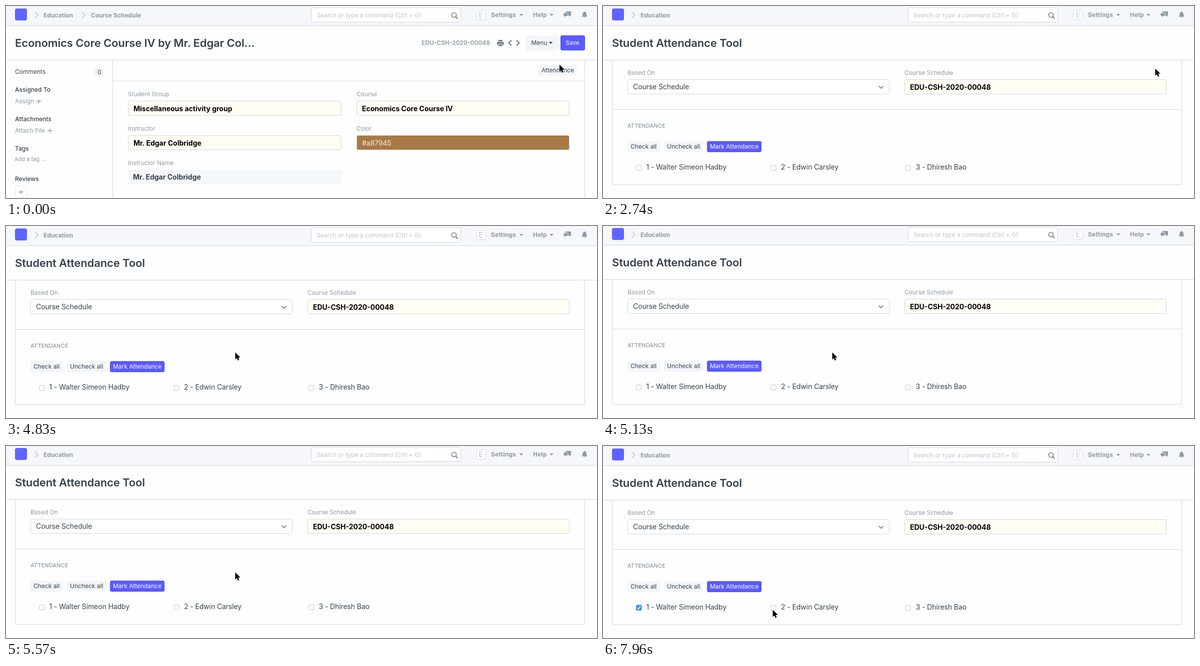
These frames come from a looping animation (1182x385 px, 8 s). An HTML page:

```html
<!DOCTYPE html>
<html lang="en">
<head>
<meta charset="utf-8">
<title>Attendance</title>
<style>
  html, body { margin: 0; width: 100%; height: 100%; overflow: hidden; background: #fefefe; }
  svg { display: block; }
  text { font: 12px Inter, sans-serif; font-optical-sizing: none; fill: #36414c; }
  .grey { fill: #8d99a6; }
  .mid { font-weight: 500; }
  .semi { font-weight: 600; fill: #8d99a6; }
  .nav { font-weight: 700; fill: #8d99a6; }
  .menu { letter-spacing: .2px; }
  .white { fill: #fff; }
  .small { font-size: 11px; fill: #8d99a6; }
  .caps { font-size: 11px; letter-spacing: .2px; fill: #7b8793; }
  .big { font-size: 14px; letter-spacing: -.1px; }
  .hint { fill: #bcc3ca; }
  .tint { fill: #f4e8da; }
  .strong { font-size: 14px; font-weight: 700; }
  .black { fill: #000; }
  .title { font-size: 22px; font-weight: 600; letter-spacing: -.12px; }
</style>
</head>
<body>
<svg id="stage" width="1182" height="385" viewBox="0 0 1182 385"></svg>
<script>
const LINE = '#d1d8dd', GREY = '#8d99a6', BLUE = '#5e64ff', PALE = '#f3f5f9', CREAM = '#fffdf4';
const COURSE = 'Economics Core Course IV', TEACHER = 'Mr. Edgar Colbridge', CODE = 'EDU-CSH-2020-00048';

const text = (x, y, s, cls = '') => `<text x="${x}" y="${y}" class="${cls}">${s}</text>`;
const rect = (x, y, w, h, fill, r = 0, extra = '') =>
  `<rect x="${x}" y="${y}" width="${w}" height="${h}" rx="${r}" fill="${fill}" ${extra}/>`;
const box = (x, y, w, h, fill, r = 3, stroke = LINE, extra = '') =>
  rect(x + .5, y + .5, w - 1, h - 1, fill, r, `stroke="${stroke}" ${extra}`);
const line = (d, color = LINE, width = 1) =>
  `<path d="${d}" fill="none" stroke="${color}" stroke-width="${width}"/>`;
const shape = (d, fill = GREY) => `<path d="${d}" fill="${fill}"/>`;
const caret = (x, y, fill = GREY) => shape(`M${x} ${y}h8l-4 4z`, fill);
const plus = (x, y) => line(`M${x - 4.5} ${y}h9M${x} ${y - 4.5}v9`, GREY, 1.3);
const crumb = x => line(`M${x} 11.5l6.5 6.5l-6.5 6.5`, '#b8c2cc', 1.4);
const group = (id, ...parts) => `<g id="${id}">${parts.join('')}</g>`;
const button = (x, y, w, h, label, pad, primary) =>
  (primary ? box(x, y, w, h, '#5b5bff', 2.5, '#444bff') : rect(x, y, w, h, PALE, 3)) +
  text(x + pad, y + h / 2 + 4, label, primary ? 'white' : '');
const field = (x, y, w, label, value, cls = 'strong black', fill = CREAM, base = 21) =>
  text(x, y - 9, label, 'grey') + box(x, y, w, 30, fill) + text(x + 11, y + base, value, cls);

const header = group('header',
  rect(0, -2, 1182, 41, '#f5f7fa'), line('M0 39.5H1182M0 108.5H1182'),
  rect(18, 5, 24, 24, BLUE, 4), crumb(57.5), text(75, 22.5, 'Education', 'nav'),
  box(610, 3, 300, 30, '#fff'), text(621, 23, 'Search or type a command (Ctrl + G)', 'hint'),
  '<circle cx="896" cy="18" r="4.6" fill="none" stroke="#5b6570" stroke-width="1.4"/>',
  line('M899.4 21.4L903.5 25.5', '#5b6570', 1.7),
  box(940, 8, 20, 20, '#fff'), text(945.5, 23, 'E', 'big hint'),
  text(970, 22, 'Settings', 'nav menu'), caret(1026.5, 16),
  text(1054, 22, 'Help', 'nav menu'), caret(1087, 16),
  shape('M1119 11h11v8h-1.5v3l-3-3H1119z'),
  `<path d="M1115 14h9v6h-4l-3 3.5v-3.5h-2z" fill="${GREY}" stroke="#f5f7fa" stroke-width=".8"/>`,
  shape('M1151.5 21.5q2-2 2-5.5q0-4 3-4.3v-1h1.2v1q3 .3 3 4.3q0 3.5 2 5.5zM1155.6 22.2h3q-1.5 2.8-3 0z'));

const schedule = group('schedule',
  crumb(151.5), text(169.5, 22.5, 'Course Schedule', 'nav'),
  text(18, 82, COURSE + ' by Mr. Edgar Col...', 'title'),
  text(831, 78, CODE, 'semi'),
  shape('M984.5 68h8.5v3h-8.5zM982 72h13.5v6h-2.5v-2h-8.5v2h-2.5zM985 77h8v3.5h-8z', '#74808c'),
  line('M1011 68.5l-5.5 5.5l5.5 5.5M1021 68.5l5.5 5.5l-5.5 5.5', '#74808c', 2.2),
  button(1040, 59, 64, 30, 'Menu', 10.5), caret(1085.5, 72, '#36414c'),
  button(1109, 59, 49, 30, 'Save', 10, true),

  line('M213.5 109V385M1157.5 109V385M214 150.5H1157'),
  text(18, 136, 'Comments'), rect(176, 123, 22, 19, PALE, 9.5), text(183, 136.5, '0'),
  text(18, 172, 'Assigned To', 'mid'), text(18, 195, 'Assign', 'grey'), plus(65.5, 191),
  text(18, 231, 'Attachments', 'mid'), text(18, 254, 'Attach File', 'grey'), plus(88, 250),
  text(18, 290, 'Tags', 'mid'), text(17, 310.5, 'Add a tag ...', 'small'),
  text(18, 351, 'Reviews', 'mid'),
  box(18, 361, 24, 24, 'none', 3, LINE, 'stroke-dasharray="3 2"'), plus(30, 373),

  group('attendance', button(1065, 118, 77, 22, 'Attendance', 6)),
  field(244, 190, 427, 'Student Group', 'Miscellaneous activity group'),
  field(701, 190, 426, 'Course', COURSE),
  field(244, 259, 427, 'Instructor', TEACHER),
  field(701, 259, 426, 'Color', '#a87945', 'big tint', '#a87945'),
  text(244, 319, 'Instructor Name', 'grey'), rect(244, 328, 427, 30, '#f5f7fa', 3),
  text(254, 348, TEACHER, 'strong'));

const students = ['Walter Simeon Hadby', 'Edwin Carsley', 'Dhiresh Bao'];
const tool = group('tool',
  text(18, 82, 'Student Attendance Tool', 'title'),
  line('M18.5 109V207.5H1157.5V109'),
  field(49, 147, 524, 'Based On', 'Course Schedule', 'big', '#fff', 20),
  line('M551.5 160.5l4.5 4.5l4.5-4.5', '#7b8a9a', 1.8),
  field(603, 147, 524, 'Course Schedule', CODE),
  group('list',
    line('M18.5 207V358.5H1157.5V207'),
    text(49, 244, 'ATTENDANCE', 'caps'),
    button(49, 271, 64, 22, 'Check all', 6),
    button(122, 271, 78, 22, 'Uncheck all', 6),
    button(208, 271, 109, 22, 'Mark Attendance', 6, true),
    ...students.map((name, i) =>
      box(66 + i * 269.5, 319, 11, 11, '#fff', 2, '#c0c3c7') +
      text(86.5 + i * 269.5, 328, `${i + 1} - ${name}`, 'big')),
    group('check', rect(66, 318.5, 11.5, 11.5, '#3b94f7', 2.5),
      line('M68.7 324.5l2.2 2.5l3.8-5.2', '#fff', 1.5))));

const arrow = `<path id="arrow" d="M0 0V14.2L3.3 11.2L5.4 16.2L7.9 15.1L5.8 10.3H10.3Z"
  fill="#000" stroke="#fff" stroke-width="1.4" paint-order="stroke"/>`;
const hand = `<path id="hand" d="M0 1.2C0-.3 2.2-.3 2.2 1.2V5.5C2.4 4.6 4.5 4.8 4.5 6
  C5 5.2 6.8 5.5 6.8 6.8C7.4 6.2 8.8 6.6 8.8 8V10.5C8.8 12.5 7.6 13 7.6 15
  H.8C.6 13-1.5 11.5-3 9C-3.8 7.6-2.2 6.6-1 8L0 9ZM2.2 5.5V8.5M4.5 6V8.5M6.8 6.8V9"
  fill="#fff" stroke="#000"/>`;

const $ = id => document.getElementById(id);
$('stage').innerHTML = group('page', header, schedule, tool) + arrow + hand;

// Pointer moves: first step, last step, step count, end x, end y, downward bow.
const START = [1107, 117.5];
const MOVES = [
  [500, 650, 2, 1104.5, 136, 0],
  [2150, 2150, 1, 1104.5, 125.5, 0],
  [3190, 3780, 5, 525.5, 165, 0],
  [4230, 4230, 1, 525, 164, 0],
  [4680, 4830, 2, 458.5, 253.5, 0],
  [5720, 6320, 5, 68.5, 322, 0],
  [6770, 7070, 3, 270, 323, 0],
  [7370, 7960, 5, 339.5, 328.5, 19],
];

function pointer(t) {
  let [x, y] = START;
  for (const [from, to, steps, endX, endY, bow] of MOVES) {
    if (t < from) break;
    const gap = (to - from) / (steps - 1) || 1;
    const k = Math.min(steps, Math.floor((t - from) / gap + .001) + 1) / steps;
    const ease = k * k * (3 - 2 * k);
    x += (endX - x) * ease;
    y += (endY - y) * ease + bow * Math.sin(Math.PI * k);
  }
  return [x, y];
}

function overscroll(t) {
  if (t < 5130 || t >= 5720) return 0;
  return t >= 5280 && t < 5570 ? -2 : -1;
}

const show = (id, on) => $(id).setAttribute('visibility', on ? 'inherit' : 'hidden');

function draw(t) {
  const opened = t >= 2590, hover = t >= 2150 && !opened;
  const place = `translate(${pointer(t)})`;
  show('schedule', !opened);
  show('tool', opened);
  show('list', t >= 2740);
  show('check', t >= 6620);
  show('arrow', !hover);
  show('hand', hover);
  $('attendance').firstChild.setAttribute('fill', hover ? '#cfdce5' : PALE);
  $('page').setAttribute('transform', `translate(0 ${overscroll(t)})`);
  $('arrow').setAttribute('transform', place);
  $('hand').setAttribute('transform', place);
}

const begin = performance.now();
(function tick() {
  draw((performance.now() - begin) % 8000);
  requestAnimationFrame(tick);
})();
</script>
</body>
</html>
```
